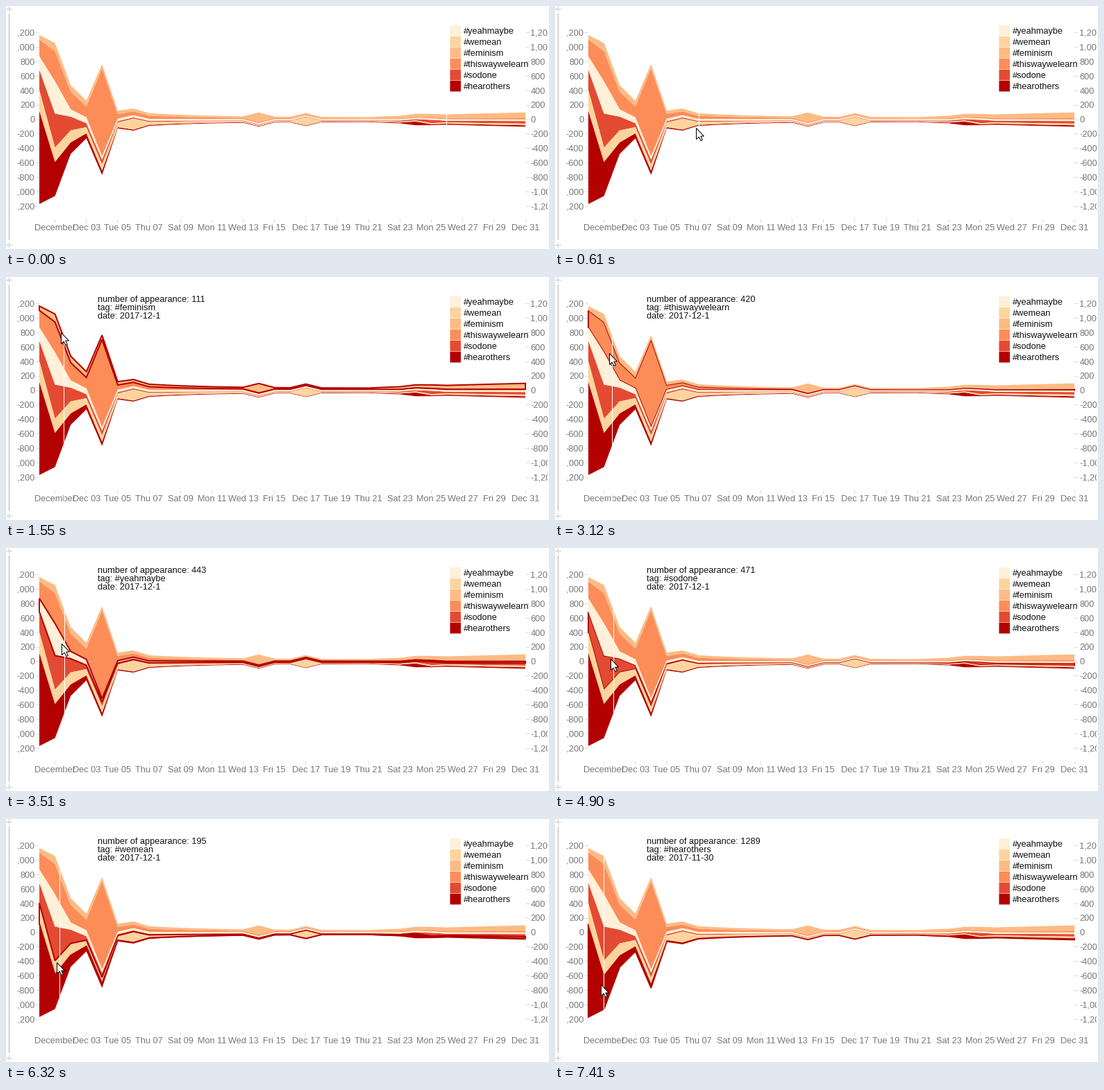
Write a matplotlib script that moves like this. It is 782 px wide and 351 px high and loops after 8 s.

```python
import numpy as np
import matplotlib.pyplot as plt
from matplotlib.animation import FuncAnimation
from matplotlib.patches import Polygon, Rectangle

W, H, DPI = 782, 351, 64
PT = 72 / DPI                      # points per pixel
LOOP, STEP = 8000, 40              # ms
X0, X1, Y0 = 48, 748, 164          # plot edges and zero line
DAY = (X1 - X0) / 31
UNIT = 251 / 2400                  # pixels per count
GREY, INK, DARK, PALE = "#777777", "#111111", "#b30000", "#dddddd"

TAGS = ["#yeahmaybe", "#wemean", "#feminism", "#thiswaywelearn", "#sodone", "#hearothers"]
COLORS = ["#fef0d9", "#fdd49e", "#fdbb84", "#fc8d59", "#e34a33", DARK]
STACK = [2, 3, 0, 4, 1, 5]         # layers from top to bottom

plt.rcParams["font.family"] = "Liberation Sans"


def build_counts():
    """Counts per day (rows) and layer from top to bottom (columns)."""
    first_days = [
        [60, 235, 185, 280, 285, 1289],
        [111, 420, 443, 471, 195, 473],
        [90, 245, 100, 190, 165, 160],
        [80, 150, 80, 55, 85, 70],
        [60, 1215, 45, 65, 85, 60]]
    # afterwards: a fading tail, a quiet level and a late rise, with a few one-day peaks
    tail = np.array([28, 55, 18, 13, 55, 10])
    level = np.array([18, 10, 16, 7, 8, 7])
    rise = np.array([62, 8, 6, 28, 15, 13])
    day = np.arange(32)[:, None]
    counts = tail * np.exp((5 - day) / 4) + level + rise * np.clip((day - 21) / 10, 0, 1) ** 0.8
    for d, layer, height in [(6, 4, 100), (14, 0, 110), (17, 4, 105), (24, 5, 40), (25, 3, 25)]:
        counts[d, layer] += height
    counts[:5] = first_days
    return counts


counts = build_counts()
xs = X0 + DAY * np.arange(32)
edges = np.hstack([np.zeros((32, 1)), counts.cumsum(axis=1)])
edges = Y0 + UNIT * (edges - edges[:, -1:] / 2)

fig = plt.figure(figsize=(W / DPI, H / DPI), dpi=DPI, facecolor="white")
ax = fig.add_axes([0, 0, 1, 1])
ax.set(xlim=(0, W), ylim=(H, 0))
ax.axis("off")


def label(x, y, s, color=GREY, ha="left"):
    return ax.text(x, y, s, color=color, ha=ha, va="baseline", fontsize=12.8 * PT, zorder=20)


def line(xx, yy, color, z=3):
    return ax.plot(xx, yy, color=color, lw=PT, zorder=z, solid_capstyle="butt", snap=False)[0]


def box(x, y, w, h, color, z):
    ax.add_patch(Rectangle((x, y), w, h, fc=color, lw=0, zorder=z, snap=False))


def draw_axes():
    for v in range(-1200, 1201, 200):
        y = Y0 - v * UNIT
        tick = np.floor(y) + 0.5
        line([43, 48], [tick, tick], PALE)
        line([748, 754], [tick, tick], PALE)
        label(41.5, y + 4.4, f"{v:,}", ha="right")
        label(755.5, y + 4.4, f"{v:,}")
    names = ["Thu", "Fri", "Sat", "Dec", "Mon", "Tue", "Wed"]
    for d in range(1, 32, 2):
        tick = np.floor(xs[d]) + 0.5
        line([tick, tick], [308, 313], PALE)
        label(xs[d], 324.3, "December" if d == 1 else f"{names[d % 7]} {d:02d}", ha="center")
    box(0, 0, 15.5, H, "white", 21)
    box(780, 0, 2, H, "white", 21)


def draw_handle():
    line([4.5, 4.5], [11, 338], "#b0b0b8", 22)
    for y in (4.5, 345.5):
        line([0, 9], [y, y], "#cccccc", 22)
        line([4.5, 4.5], [y - 4, y + 4], "#cccccc", 22)


def draw_legend():
    for i, (tag, color) in enumerate(zip(TAGS, COLORS)):
        box(639.5, 28 + 16 * i, 15.5, 15.5, color, 10)
        label(659, 40 + 16 * i, tag, INK)


def draw_layers():
    layers = []
    for k, i in enumerate(STACK):
        pts = np.vstack([np.c_[xs, edges[:, k]], np.c_[xs, edges[:, k + 1]][::-1]])
        layers.append(ax.add_patch(Polygon(pts, closed=True, fc=COLORS[i], ec=DARK, lw=0,
                                           joinstyle="miter", zorder=9 - 0.5 * i)))
    return layers


draw_axes()
draw_handle()
draw_legend()
layers = draw_layers()
tip = [label(132, y, "", INK) for y in (36, 48, 60)]
guide = line([0, 0], [10, 330], "white", 30)

ARROW = np.array([[0, 0], [0, 16], [3.7, 12.6], [6.4, 18], [8.9, 17], [6.3, 11.6], [11, 11.5]])
cursor = ax.add_patch(Polygon(ARROW, closed=True, fc="white", ec="black", lw=PT, zorder=40))

# pointer moves: first tick, last tick, end point
TICK, ENTER = 78.1, 220
ENTRY = np.array([330, 260])
MOVES = [(0, 10, (76, 91)), (10, 13, (74, 75)), (14, 17, (81, 82)), (23, 25, (81, 91)),
         (26, 29, (78, 105)), (36, 42, (80, 138)), (54, 60, (80, 164)),
         (66, 76, (73, 202)), (77, 78, (73, 207)), (86, 92, (66, 239))]


def pointer(t):
    tick = np.floor((t - ENTER) / TICK + 0.05)
    if tick < 0:
        return None
    pos = ENTRY
    for a, b, end in MOVES:
        pos = pos + np.clip((tick - a) / (b - a), 0, 1) * (np.array(end) - pos)
    return np.round(pos)


def layer_at(x, y):
    bounds = [np.interp(x, xs, e) for e in edges.T]
    k = np.searchsorted(bounds, y) - 1
    return k if 0 <= k < len(STACK) else None


def update(i):
    pos = pointer(i * STEP + STEP / 2)
    hit = None
    guide_x = 634.5
    cursor.set_visible(pos is not None)
    if pos is not None:
        x, y = pos + 0.5
        cursor.set_xy(ARROW + [x, y])
        guide_x = x + 4
        hit = layer_at(x, y)
    guide.set_xdata([guide_x, guide_x])
    for k, layer in enumerate(layers):
        layer.set_linewidth(2 * PT if k == hit else 0)
    rows = [""] * 3
    if hit is not None:
        day = int((x - X0) / DAY)
        date = f"2017-12-{day}" if day else "2017-11-30"
        rows = [f"number of appearance: {counts[day, hit]:.0f}",
                f"tag: {TAGS[STACK[hit]]}", f"date: {date}"]
    for text, row in zip(tip, rows):
        text.set_text(row)
    return [*layers, *tip, guide, cursor]


anim = FuncAnimation(fig, update, frames=LOOP // STEP, interval=STEP, repeat=True,
                     repeat_delay=0, blit=False)
plt.show()
```
